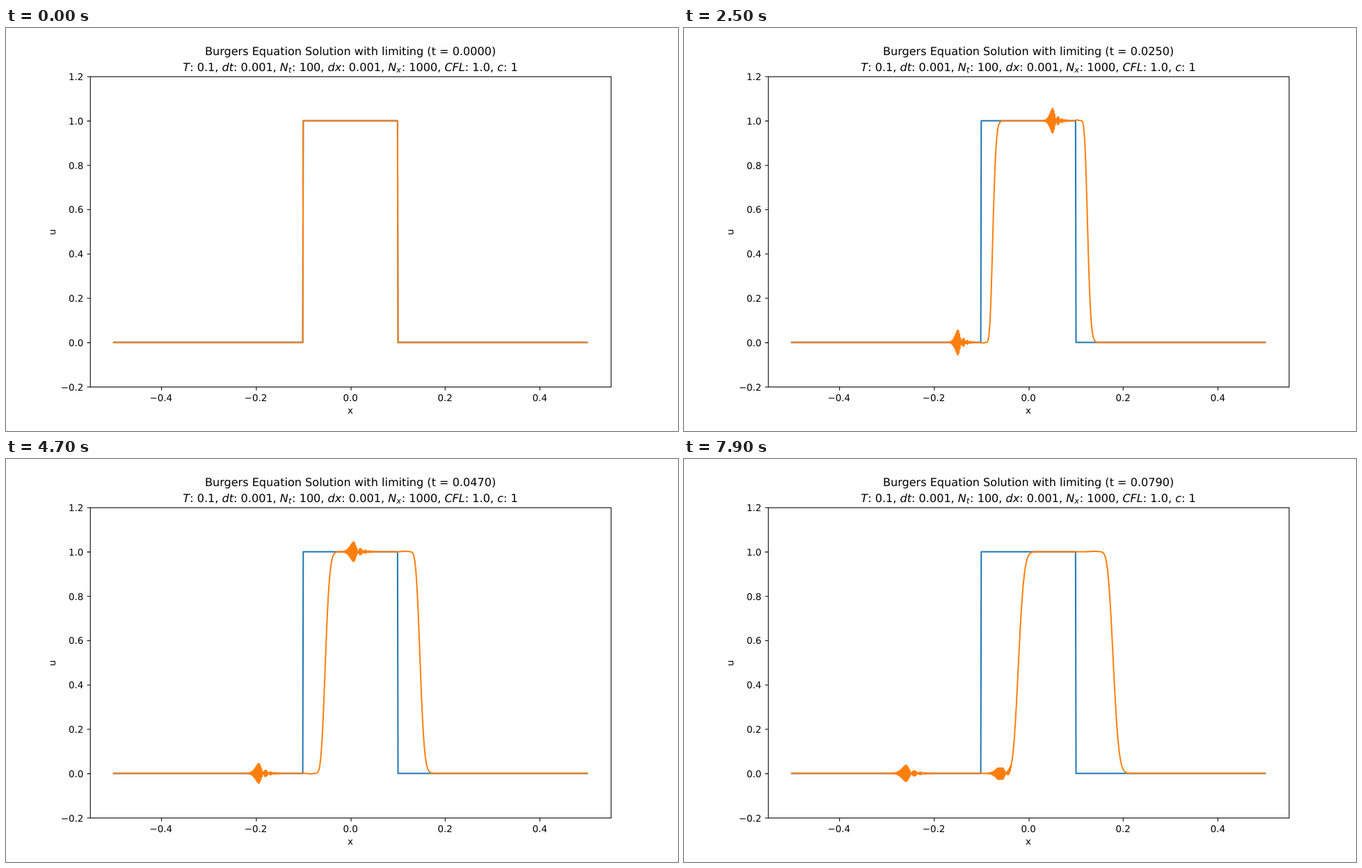
An HTML page that plays this animation: 966x580 px, repeating every 8000 ms.

```html
<!DOCTYPE html>
<html lang="en">
<head>
<meta charset="utf-8">
<title>Step advection</title>
<style>
  html, body { margin: 0; width: 100%; height: 100%; overflow: hidden; background: #fff; }
  svg { display: block; }
  text { font-family: "DejaVu Sans", sans-serif; font-size: 13.89px; fill: #000; white-space: pre; text-rendering: geometricPrecision; }
  .title { font-size: 16.67px; text-anchor: middle; }
  .mid { text-anchor: middle; }
  .end { text-anchor: end; }
  .i { font-style: italic; }
  .sub { font-style: italic; font-size: 11.67px; }
  .axis { fill: none; stroke: #000; stroke-width: 1.11; }
  .curve { fill: none; stroke-width: 2.083; stroke-linejoin: round; stroke-linecap: square; }
</style>
</head>
<body>
<svg width="966" height="580" viewBox="0 0 1000 600" preserveAspectRatio="none">
  <path id="start" class="curve" stroke="#1f77b4"/>
  <path id="wave" class="curve" stroke="#ff7f0e"/>
  <path id="ticks" class="axis"/>
  <rect class="axis" x="125.5" y="72.5" width="775" height="462"/>
  <g id="labels"></g>
  <text class="mid" x="512.5" y="574.5">x</text>
  <text class="mid" transform="translate(73 304) rotate(-90)">u</text>
  <text id="title" class="title" x="512.5" y="40"></text>
  <text class="title" x="512.5" y="64"><tspan class="i">T</tspan>: 0.1, <tspan class="i">dt</tspan>: 0.001, <tspan class="i">N</tspan><tspan class="sub" dy="2.7">t</tspan><tspan dx="0.8" dy="-2.7">: 100, </tspan><tspan class="i">dx</tspan>: 0.001, <tspan class="i">N</tspan><tspan class="sub" dy="2.7">x</tspan><tspan dx="0.8" dy="-2.7">: 1000, </tspan><tspan class="i">CFL</tspan>: 1.0, <tspan class="i">c</tspan>: 1</text>
</svg>
<script>
const STEPS = 80, STEP_MS = 100, CELLS = 999;
const RISE = 400, FALL = 600;
const byId = id => document.getElementById(id);
const px = x => 512.5 + 704.545 * x;
const py = u => 468 - 330 * u;

function drawAxes() {
  let ticks = '', labels = '';
  const format = v => v.toFixed(1).replace('-', '\u2212');
  for (let k = -2; k <= 2; k++) {
    const x = px(k / 5);
    ticks += `M${Math.round(x) + 0.5} 534.5v4.86`;
    labels += `<text class="mid" x="${x}" y="555">${format(k / 5)}</text>`;
  }
  for (let k = -1; k <= 6; k++) {
    const y = Math.round(py(k / 5));
    ticks += `M125.5 ${y + 0.5}h-4.86`;
    labels += `<text class="end" x="115.3" y="${y + 5.5}">${format(k / 5)}</text>`;
  }
  byId('ticks').setAttribute('d', ticks);
  byId('labels').innerHTML = labels;
}

// Airy function by power series, for moderate z
function airy(z) {
  let f = 1, g = z, tf = 1, tg = z;
  for (let k = 3; k < 120; k += 3) {
    tf *= z ** 3 / (k * (k - 1));
    tg *= z ** 3 / (k * (k + 1));
    f += tf;
    g += tg;
  }
  return 0.355028 * f - 0.258819 * g;
}

// Smeared step: Erlang distribution of order n, slightly widened
function front(n, d) {
  const s = n + 0.96 * (d - n);
  if (s <= 0) return 0;
  if (s > 3 * n + 60) return 1;
  let term = Math.exp(-s), tail = 0;
  for (let m = 0; m < n; m++) {
    tail += term;
    term *= s / (m + 1);
  }
  return 1 - tail;
}

// Slight dip just behind the front
function dip(n, d) {
  const root = Math.sqrt(n), q = (d - n + 4.6 * root) / root;
  return -0.004 * Math.min(1, n / 20) * Math.exp(-n / 90 - q * q);
}

// Grid-scale ripple running left at about twice the front speed
function ripple(n, d, limit) {
  const peak = Math.min(0.165, 0.186 * n ** -0.37);
  const width = 0.29 / peak;
  const z = -1.02 + (1.8 - 2.02 * n - d) / width;
  if (z < -8 || z > 4) return 0;
  const damping = Math.exp(0.42 * Math.min(0, z + 1.02));
  const size = Math.min(peak * limit, peak * damping * airy(z) / 0.5357);
  return d % 2 ? -size : size;
}

function jump(n, d, limit) {
  if (!n) return d >= 0 ? 1 : 0;
  return front(n, d) + dip(n, d) + ripple(n, d, limit);
}

// The upper ripple is flattened while it crosses the rising front
function crossingLimit(n) {
  const s = Math.max(0, Math.min(1, (n - 58) / 12));
  return 1 - 0.32 * s * s * (3 - 2 * s);
}

function curve(n) {
  const limit = crossingLimit(n);
  let d = '';
  for (let i = 0; i <= CELLS; i++) {
    const u = jump(n, i - RISE, 1) - jump(n, i - FALL, limit);
    d += (i ? 'L' : 'M') + px(i / CELLS - 0.5).toFixed(2) + ' ' + py(u).toFixed(2);
  }
  return d;
}

let shown = -1;
function render(ms) {
  const n = Math.floor(ms / STEP_MS) % STEPS;
  if (n === shown) return;
  shown = n;
  byId('wave').setAttribute('d', curve(n));
  byId('title').textContent =
    `Burgers Equation Solution with limiting (t = ${(n / 1000).toFixed(4)})`;
}

drawAxes();
byId('start').setAttribute('d', curve(0));
render(0);
const origin = performance.now();
function tick() {
  render(Math.max(0, performance.now() - origin));
  requestAnimationFrame(tick);
}
requestAnimationFrame(tick);
</script>
</body>
</html>
```
